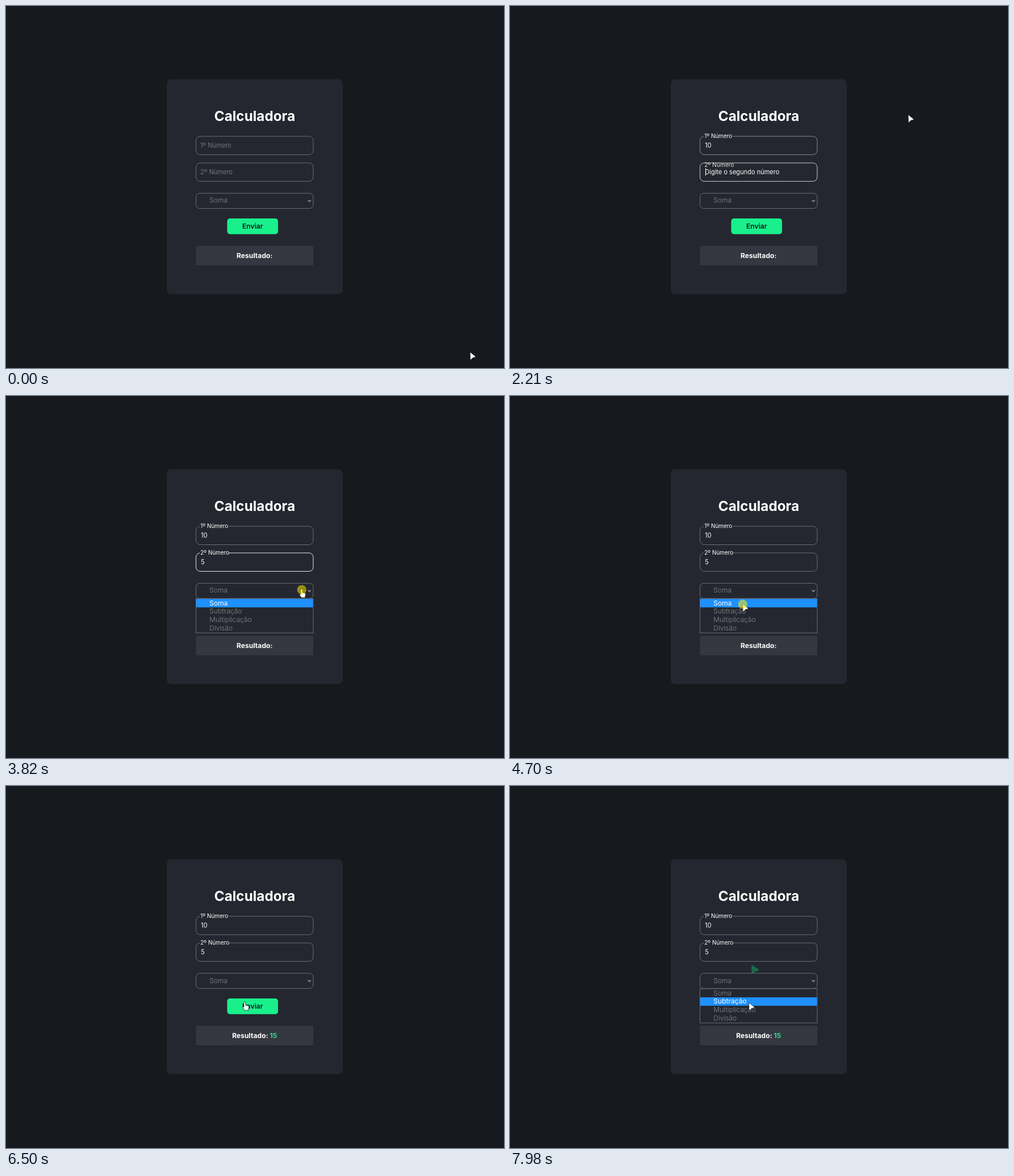
These frames come from a looping animation (877x639 px, 8000 ms). An HTML page:

```html
<!DOCTYPE html>
<html lang="pt">
<head>
<meta charset="utf-8">
<title>Calculadora</title>
<style>
  html, body { margin: 0; width: 100%; height: 100%; overflow: hidden; background: #16191d; }
  svg { display: block; width: 877px; height: 639px; font-family: Inter, "Open Sans", sans-serif; }
  .box { stroke: #74767b; stroke-width: .9; fill: #24272f; }
  .input { font-size: 11.04px; fill: #fff; }
  .option { font-size: 12.05px; font-weight: 300; fill: #85878b; }
  .strong { font-size: 12.14px; font-weight: 700; fill: #fff; text-anchor: middle; }
  .cursor { fill: #fff; stroke: #14171b; stroke-width: .8; stroke-linejoin: round; }
</style>
</head>
<body>
<svg viewBox="0 0 877 639">
  <rect width="877" height="639" fill="#16191d"/>
  <rect x="283" y="129.3" width="310" height="379.4" rx="8" fill="#24272f"/>
  <text x="438" y="203.4" text-anchor="middle" font-size="24.29" font-weight="700" fill="#fff">Calculadora</text>
  <g id="fields"></g>
  <path id="ghost" d="M1.5 1.5L12 8.6L7.5 10.5L1.5 13.5Z" transform="translate(425 316)"
        fill="#1f694c" stroke="#1f694c" stroke-width="2.4" stroke-linejoin="round"/>
  <rect class="box" x="334.6" y="330.6" width="206.4" height="26.8" rx="6.5"/>
  <text id="choice" class="option" x="358.3" y="347.3">Soma</text>
  <path d="M531.6 342.6l2.7 2.7l2.7-2.7" fill="none" stroke="#a5a7aa" stroke-width="1.3"/>
  <rect id="button" x="389.5" y="375" width="89.6" height="27.7" rx="5"/>
  <text id="send" x="434.3" y="393.2" class="strong" style="font-weight:600">Enviar</text>
  <rect x="334.5" y="423.2" width="206.7" height="34.6" rx="1.5" fill="#34373f"/>
  <text class="strong" x="437.8" y="444.7">Resultado:<tspan id="result" fill="#2ed688"></tspan></text>
  <g id="list">
    <rect class="box" x="334.6" y="357.8" width="206.4" height="60.4"/>
    <rect id="mark" x="335" width="205.6" height="14.9" fill="#1e90ff"/>
  </g>
  <g id="pointer">
    <path id="arrow" class="cursor" d="M.2 1Q0-.3 1.2 .5L9.7 7.5Q10.8 8.7 9.2 9L5.6 9.8L2 13Q.5 14 .5 12.4Z"/>
    <path id="hand" class="cursor" d="M-1.5 8.5V1Q-1.5-.5 0-.5T1.5 1V5.5L6 6.5Q7.4 7 7.2 9L6.4 12.3V14.5H-.5L-3.6 9.8Q-3.8 8-1.5 8.5Z"/>
    <path id="beam" d="M-2-6H2M0-6V6M-2 6H2" fill="none" stroke="#fff"/>
    <circle id="click" r="8.2" cx=".3" cy=".5" fill="#fff000" opacity=".52"/>
  </g>
</svg>
<script>
const LOOP = 8000, RELOAD = 5700, FADE = 300;
const $ = id => document.getElementById(id);
const show = (el, on) => { el.style.display = on ? '' : 'none'; };
const within = (t, spans) => spans.some(([a, b]) => t >= a && t < b);
const mix = (a, b, p) => a + (b - a) * p;
const blend = (a, b, p) => `rgb(${a.map((v, i) => Math.round(mix(v, b[i], p)))})`;
const ease = (t, start, length = FADE) =>
  1 - (1 - Math.min(1, Math.max(0, (t - start) / length))) ** 2.3;

const CARD = [36, 39, 47], DARK = [24, 24, 24], GREEN = [25, 240, 139];
const WHITE = [255, 255, 255], GREY = [116, 118, 123], INK = [23, 25, 29];

function add(parent, tag, attrs, text = '') {
  const el = document.createElementNS('http://www.w3.org/2000/svg', tag);
  for (const key in attrs) el.setAttribute(key, attrs[key]);
  el.textContent = text;
  parent.append(el);
  return el;
}

const fields = [
  { y: 230, name: '1º Número', hint: 'Digite o primeiro número', focus: 790, blur: 2070,
    typed: [[1470, '1', 349.4], [1670, '10', 357]], caret: [[790, 2070]] },
  { y: 277, name: '2º Número', hint: 'Digite o segundo número', focus: 2070, blur: 3830,
    typed: [[2810, '5', 351.3]], caret: [[2070, 2550], [2810, 3340]] }
].map(f => {
  const g = $('fields');
  f.box = add(g, 'rect', { class: 'box', x: 334.6, y: f.y, width: 206.4, height: 32.5, rx: 7.5 });
  f.back = add(g, 'rect', { x: 341.2, y: f.y - 7, width: 51, height: 12 });
  f.label = add(g, 'text', { x: 342.3 }, f.name);
  f.value = add(g, 'text', { class: 'input', x: 343.3, y: f.y + 20.3 });
  f.bar = add(g, 'rect', { y: f.y + 9.5, width: 1, height: 13, fill: '#fff' });
  return f;
});

const options = ['Soma', 'Subtração', 'Multiplicação', 'Divisão'].map((name, i) =>
  add($('list'), 'text', { class: 'option', x: 358.3, y: 369.6 + i * 14.7 }, name));

// time, x, y of the pointer tip
const path = [
  [0, 817, 611], [70, 817, 611], [400, 610, 400], [740, 435, 246], [940, 435, 246],
  [1140, 701, 192], [3210, 701, 192], [3740, 520.5, 341.5], [4030, 520.5, 341.5],
  [4600, 409.5, 367], [4870, 409.5, 367], [5080, 424, 305], [5450, 420.5, 381.5],
  [6500, 420.5, 381.5], [6650, 443, 402], [6850, 428, 318], [7000, 390, 254],
  [7310, 438, 345], [7600, 438, 345], [7900, 420.5, 382.5], [8000, 420.5, 382.5]
];
const clicks = [[760, 900], [3750, 3960], [4640, 4830], [5390, 5490], [7440, 7600]];
const opened = [[3780, 4830], [7570, 8000]];

function pointerAt(t) {
  const i = path.findIndex(k => k[0] > t);
  const [a, b] = [path[i - 1], path[i]];
  const p = (t - a[0]) / (b[0] - a[0]), s = p * p * (3 - 2 * p);
  return [mix(a[1], b[1], s), mix(a[2], b[2], s)];
}

function drawField(f, t) {
  const up = ease(t, f.focus);
  const lit = up * (1 - ease(t, f.blur));
  const loaded = t < RELOAD ? 1 : ease(t, RELOAD, 400);
  const fill = blend(DARK, CARD, loaded);
  f.box.style.fill = fill;
  f.box.style.stroke = blend(GREY, WHITE, lit);
  f.back.style.fill = fill;
  show(f.back, up > .95);
  f.label.setAttribute('y', mix(f.y + 20.3, f.y + 2.6, up));
  f.label.setAttribute('font-size', mix(11.04, 9.94, up));
  f.label.style.fill = blend(GREY, WHITE, up);

  const key = f.typed.filter(k => t >= k[0]).pop();
  f.value.textContent = key ? key[1] : t >= f.focus ? f.hint : '';
  f.value.style.opacity = key ? 1 : Math.min(1, up * 1.4);
  f.bar.setAttribute('x', key ? key[2] : 344);
  show(f.bar, within(t, f.caret));
}

function drawPointer(t, x, y, open) {
  $('pointer').setAttribute('transform', `translate(${x} ${y})`);
  const inRow = x > 334 && x < 541;
  const overField = inRow && fields.some(f => y > f.y && y < f.y + 32);
  const overSelect = inRow && y > 330 && y < 358;
  const overButton = !open && x > 389 && x < 479 && y > 375 && y < 403;
  show($('beam'), overField);
  show($('hand'), overSelect || overButton);
  show($('arrow'), !overField && !overSelect && !overButton);
  show($('click'), within(t, clicks));
}

function draw(t) {
  const [x, y] = pointerAt(t);
  const open = within(t, opened);
  const sent = t >= RELOAD;
  const loaded = sent ? ease(t, RELOAD, 400) : 1;

  fields.forEach(f => drawField(f, t));
  $('choice').setAttribute('y', sent ? 348 : 347.3);
  $('button').style.fill = blend(DARK, GREEN, loaded);
  $('send').style.fill = blend(WHITE, INK, loaded);
  $('result').textContent = sent ? ' 15' : '';
  show($('ghost'), t >= 6850);

  show($('list'), open);
  const row = Math.max(0, Math.min(3, Math.floor((y - 358.2) / 14.8)));
  $('mark').setAttribute('y', 358.2 + row * 14.8);
  options.forEach((o, i) => {
    o.style.fill = i === row ? '#fff' : '';
    o.style.fontWeight = i === row ? 400 : '';
  });
  drawPointer(t, x, y, open);
}

const start = performance.now();
function tick() {
  draw((performance.now() - start) % LOOP);
  requestAnimationFrame(tick);
}
tick();
</script>
</body>
</html>
```
